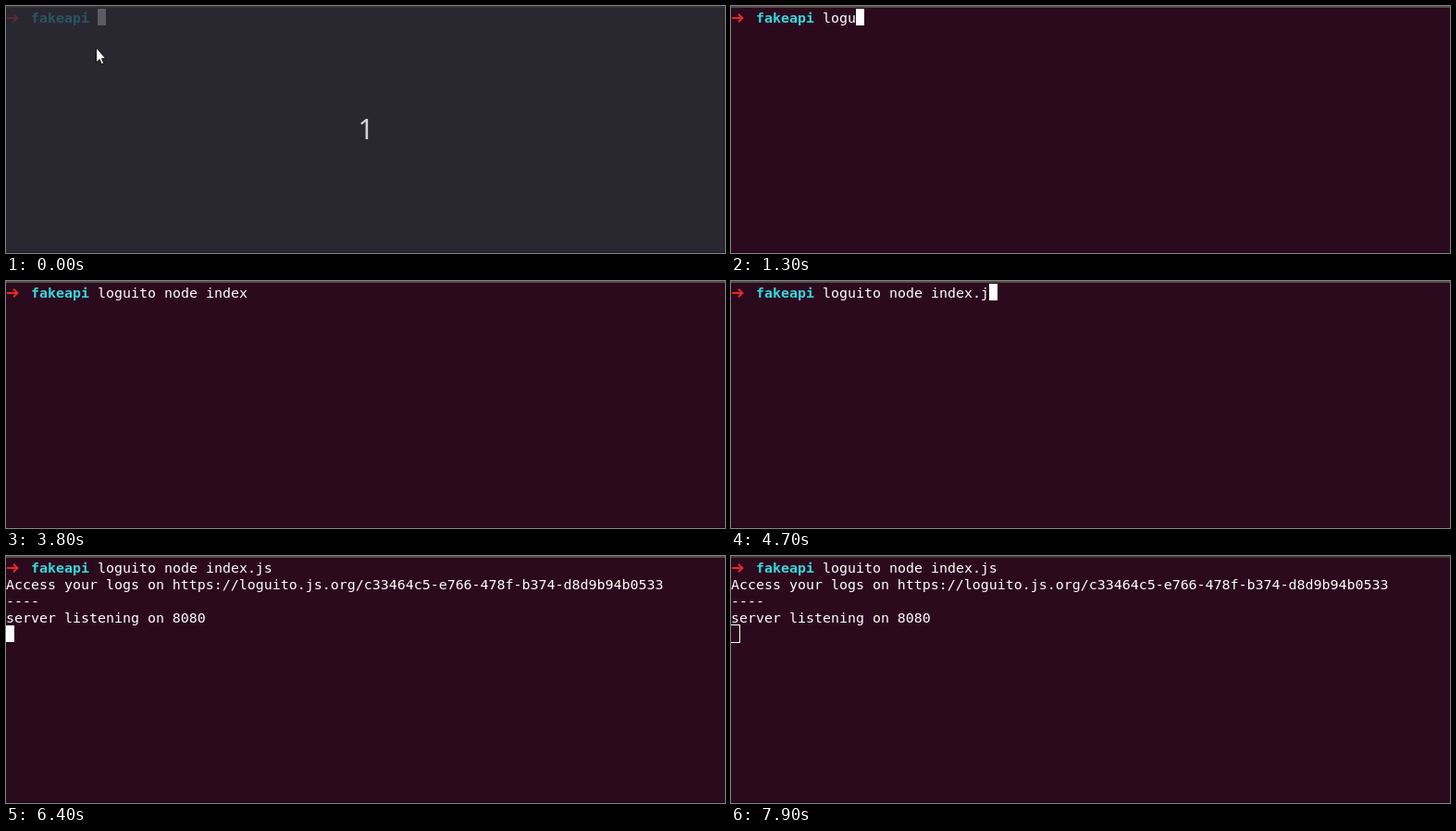
An HTML page that plays this animation: 777 by 267 pixels, repeating every 8 s.

```html
<!DOCTYPE html>
<html lang="en">
<head>
<meta charset="utf-8">
<title>Terminal session</title>
<style>
  html, body { margin: 0; width: 100%; height: 100%; overflow: hidden; background: #2c0a1e; }
  svg { display: block; width: 777px; height: 267px; }
  text { font-family: "DejaVu Sans Mono", "Noto Sans Mono", monospace; font-size: 14.95px; white-space: pre; }
  .dir { font-weight: bold; }
  .count { font-family: "Noto Sans", "Open Sans", sans-serif; font-size: 30px; text-anchor: middle; }
</style>
</head>
<body>
<svg viewBox="0 0 777 267">
  <rect id="bg" width="777" height="267"/>
  <rect id="bar" width="777" height="2"/>
  <rect y="266" width="777" height="1" fill="#000" opacity=".35"/>
  <path id="arrow" d="M1 13H12M8 8.8L12.4 13L8 17.2" fill="none" stroke-width="2.1"/>
  <text id="dir" class="dir" x="27" y="18">fakeapi</text>
  <g fill="#fff">
    <text id="cmd" x="99" y="18"></text>
    <g id="access">
      <text x="0" y="36">Access your logs on https://loguito.js.org/c33464c5-e766-478f-b374-d8d9b94b0533</text>
      <text x="0" y="54">----</text>
    </g>
    <text id="server" x="0" y="72">server listening on 8080</text>
  </g>
  <rect id="caret" width="9" height="18"/>
  <rect id="hollow" x="-.5" y="74.5" width="10" height="19" fill="none" stroke="#fff"/>
  <g id="countdown">
    <text class="count" x="389" y="143.5" fill="#d6d0dc">1</text>
    <path d="M97.5 45V61L101 57.8L103.3 63L105.8 61.9L103.5 56.8H107.8Z" fill="#fff" stroke="#111" stroke-width="1"/>
  </g>
</svg>
<script>
const LOOP = 8000, CELL = 9, ROW = 18, HALF_BLINK = 550;
const DIM_END = 100, ENTER = 5000, ACCESS = 5400, SERVER = 5600, BLUR = 7500;

// each burst is typed evenly from its first key to its last
const BURSTS = [
  { text: "l", from: 900, to: 900 },
  { text: "ogu", from: 1300, to: 1300 },
  { text: "ito ", from: 1500, to: 1900 },
  { text: "node", from: 2200, to: 2600 },
  { text: " index", from: 2700, to: 3200 },
  { text: ".js", from: 4500, to: 4800 }
];
const KEYS = BURSTS.flatMap(({ text, from, to }) =>
  [...text].map((char, i) => ({
    char, at: from + (to - from) * i / Math.max(1, text.length - 1)
  })));

const $ = id => document.getElementById(id);
const set = (id, attrs) => {
  for (const key in attrs) $(id).setAttribute(key, attrs[key]);
};
const show = (id, on) => set(id, { visibility: on ? "visible" : "hidden" });

function caretCell(t, typed) {
  if (t < ENTER) return [11 + typed, 0];
  return [0, t < ACCESS ? 1 : t < SERVER ? 3 : 4];
}

function draw(t) {
  const dim = t < DIM_END, blurred = t >= BLUR;
  const typed = KEYS.filter(key => key.at <= t);
  const [col, row] = caretCell(t, typed.length);

  // every key press restarts the blink with the caret lit
  const lastKey = typed.length ? typed[typed.length - 1].at : DIM_END - HALF_BLINK;
  const lit = (t - lastKey) % (2 * HALF_BLINK) < HALF_BLINK;

  set("bg", { fill: dim ? "#292831" : "#2c0a1e" });
  set("bar", { fill: dim ? "#343438" : blurred ? "#3d3b37" : "#504e48" });
  set("arrow", { stroke: dim ? "#5b2934" : "#e02b28" });
  set("dir", { fill: dim ? "#2a5561" : "#34d9dc" });
  set("caret", { x: col * CELL, y: 3 + row * ROW, fill: dim ? "#5c5a64" : "#fff" });
  $("cmd").textContent = typed.map(key => key.char).join("");

  show("countdown", dim);
  show("access", t >= ACCESS);
  show("server", t >= SERVER);
  show("caret", lit && !blurred);
  show("hollow", blurred);
}

const start = performance.now();
function tick() {
  draw((performance.now() - start) % LOOP);
  requestAnimationFrame(tick);
}
tick();
</script>
</body>
</html>
```
